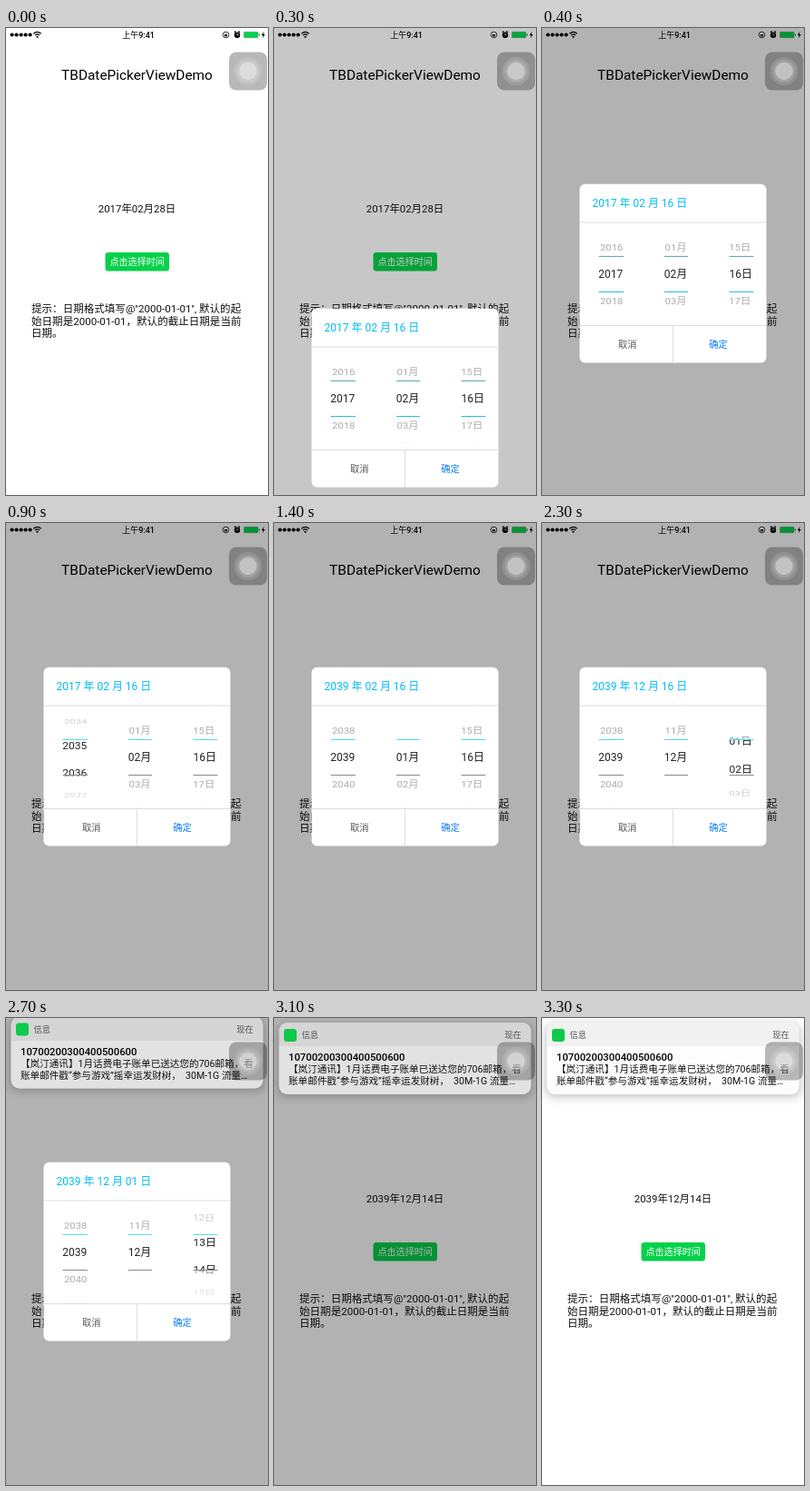
Recreate the animation shown at these times as an HTML page. Size 289 by 514 pixels, loop 4000 ms.

```html
<!DOCTYPE html>
<html lang="zh-CN">
<head>
<meta charset="utf-8">
<title>TBDatePickerViewDemo</title>
<style>
  html, body { margin: 0; width: 100%; height: 100%; overflow: hidden; background: #fff; }
  svg { display: block; width: 100vw; height: 100vh; font-family: Roboto, "Noto Sans CJK SC", sans-serif; }
  text { white-space: pre; }
  .mid { text-anchor: middle; }
</style>
</head>
<body>
<svg viewBox="0 0 289 514">
  <defs>
    <filter id="blur" x="-20%" y="-40%" width="140%" height="180%"><feGaussianBlur stdDeviation="5"/></filter>
    <clipPath id="inside"><rect x="42" y="238" width="205" height="40"/></clipPath>
    <clipPath id="outside"><path d="M42 203h205v35H42zM42 278h205v35H42z"/></clipPath>
  </defs>
  <rect width="289" height="514" fill="#fff"/>

  <g id="topBar">
    <g id="dots"></g>
    <g fill="none" stroke="#000" stroke-width="1.2">
      <path d="M30.3 6.2Q34.5 2.4 38.7 6.2M32 8.1Q34.5 5.8 37 8.1"/>
      <circle cx="242.5" cy="7.5" r="3.3" stroke-width=".8"/>
      <path d="M252 4.8l1.6-1.3M258 4.8l-1.6-1.3"/>
    </g>
    <circle cx="34.5" cy="9.8" r="1.1"/>
    <path d="M241 7h3v2.3h-3z"/>
    <circle cx="255" cy="7.7" r="3.2"/>
    <path d="M255 5.8v2h1.6" fill="none" stroke="#fff" stroke-width=".7"/>
    <rect x="262.5" y="4.3" width="15.5" height="6.4" rx="1" fill="#06d24c" stroke="#4a9a62" stroke-width=".5"/>
    <path d="M278.8 6.2h1.2v2.6h-1.2z" fill="#4a9a62"/>
    <path d="M284.6 3.8l-2.8 4.3h1.7l-.7 3.2 2.9-4.4h-1.8z"/>
    <text class="mid" x="146" y="10.8" font-size="9" font-weight="500">上午9:41</text>
    <text class="mid" x="144.5" y="57" font-size="15.4">TBDatePickerViewDemo</text>
  </g>

  <text id="chosen" class="mid" x="144.5" y="202.6" font-size="11.4" fill="#111"></text>
  <rect x="109.5" y="247" width="70.5" height="20.5" rx="3" fill="#04d14a"/>
  <text class="mid" x="144.7" y="261" font-size="10.1" fill="#fff">点击选择时间</text>
  <g font-size="11.56" fill="#111">
    <text x="28" y="313.2">提示：日期格式填写<tspan x="132">@"2000-01-01",</tspan><tspan x="213">默认的起</tspan></text>
    <text x="28" y="326.5">始日期是2000-01-01，默认的截止日期是当前</text>
    <text x="28" y="339.8">日期。</text>
  </g>

  <g id="noticeBase">
    <rect x="3" y="6" width="283" height="82" rx="10" fill-opacity=".2" filter="url(#blur)"/>
    <rect x="5.5" y="5" width="278" height="79" rx="9" fill="#fff"/>
  </g>
  <rect id="dim" width="289" height="514"/>

  <g id="notice">
    <path d="M5.5 31V14a9 9 0 0 1 9-9h260a9 9 0 0 1 9 9v17z" fill="#ebe9eb" fill-opacity=".64"/>
    <path d="M5.5 31h278v44a9 9 0 0 1-9 9h-260a9 9 0 0 1-9-9z" fill="#fcfcfc" fill-opacity=".65"/>
    <rect x="11" y="12" width="14" height="14" rx="3" fill="#0dca4a"/>
    <g font-size="9.3" fill="#555">
      <text x="30.5" y="22.4">信息</text>
      <text x="254.3" y="22.4">现在</text>
    </g>
    <text x="16" y="47.4" font-size="11.3" font-weight="500">10700200300400500600</text>
    <g font-size="10.6" fill="#111">
      <text x="16" y="60.4">【岚汀通讯】1月话费电子账单已送达您的706邮箱，看</text>
      <text x="16" y="73.2">账单邮件戳“参与游戏”摇幸运发财树，<tspan x="198">30M-1G</tspan><tspan x="238">流量…</tspan></text>
    </g>
  </g>

  <g id="dialog">
    <rect x="41.5" y="158.7" width="206" height="196.8" rx="6" fill="#fff"/>
    <text id="heading" x="55.5" y="184.3" font-size="12" fill="#00bdf7"></text>
    <path d="M41.5 201h206M41.5 314.5h206M144.5 314.5v41" stroke="#dedede"/>
    <g id="outer" clip-path="url(#outside)"></g>
    <g id="inner" clip-path="url(#inside)"></g>
    <path id="upperLine" d="M62.5 238.4h27.5M135 238.4h26M206.5 238.4h27"/>
    <path id="lowerLine" d="M62.5 277.5h27.5M135 277.5h26M206.5 277.5h27"/>
    <g class="mid" font-size="10.3">
      <text x="94.3" y="339" fill="#555">取消</text>
      <text x="194.5" y="339" fill="#0a7cff">确定</text>
    </g>
  </g>

  <rect x="246" y="26.5" width="42" height="42" rx="8" fill-opacity=".28"/>
  <g fill="#fff">
    <circle cx="267" cy="47.5" r="15.5" fill-opacity=".13"/>
    <circle cx="267" cy="47.5" r="12.3" fill-opacity=".15"/>
    <circle cx="267" cy="47.5" r="9.7" fill-opacity=".35"/>
  </g>
</svg>
<script>
const LOOP = 4000, STEP = 100;
const ROW_ANGLE = 0.6, RADIUS = 52, WHEEL_Y = 258;
const $ = id => document.getElementById(id);
const pad = n => String(n).padStart(2, "0");

const dialogDrop = [[300, 150], [400, 13], [500, 0], [2900, 0], [3000, 150]];
const noticeShift = [[2700, -6.5], [2800, 0]];
const dimming = [[200, 0], [300, 0.22], [400, 0.3], [3100, 0.3], [3200, 0]];
const wheels = [
  { x: 75.8, unit: "", min: 2000, max: 2100,
    keys: [[500, 2017], [600, 2020], [700, 2025.5], [800, 2031.3], [900, 2035.44], [1000, 2037.6], [1100, 2038.6], [1200, 2039]] },
  { x: 147.6, unit: "月", min: 1, max: 12,
    keys: [[1200, 2], [1400, 1], [1500, 1], [1600, 2.5], [1700, 6.8], [1800, 10.4], [1900, 11.6], [2000, 12]] },
  { x: 219.2, unit: "日", min: 1, max: 31,
    keys: [[2000, 16], [2100, 12], [2200, 5.5], [2300, 1.6], [2400, 1], [2500, 4], [2600, 9.8], [2700, 13.37], [2800, 14]] },
];
// Each date holds from its start time until the next one.
const headings = [
  [0, [2017, 2, 16]], [1300, [2039, 2, 16]], [1500, [2039, 1, 16]],
  [2100, [2039, 12, 16]], [2500, [2039, 12, 1]], [2900, [2039, 12, 14]],
];

function valueAt(keys, t) {
  const next = keys.findIndex(([time]) => time > t);
  if (next === 0) return keys[0][1];
  if (next < 0) return keys[keys.length - 1][1];
  const [t0, v0] = keys[next - 1], [t1, v1] = keys[next];
  return v0 + (v1 - v0) * (t - t0) / (t1 - t0);
}

function wheelRows({ x, unit, min, max, keys }, t, selected) {
  const position = valueAt(keys, t), middle = Math.round(position);
  let rows = "";
  for (let v = Math.max(min, middle - 2); v <= Math.min(max, middle + 2); v++) {
    const offset = v - position, distance = Math.abs(offset);
    const y = WHEEL_Y + RADIUS * Math.sin(offset * ROW_ANGLE);
    const squash = Math.cos(offset * ROW_ANGLE);
    const opacity = selected ? 1 : Math.max(0, Math.min(0.45, 0.38 - 0.37 * (distance - 1)));
    const rowX = selected ? x : x + (144.5 - x) * 0.013;
    const scale = selected ? 1 : 0.94;
    rows += `<text class="mid" y="4.3" font-size="12" fill="#222" opacity="${opacity}"
      transform="translate(${rowX} ${y}) scale(${scale} ${squash})">${pad(v)}${unit}</text>`;
  }
  return rows;
}

function show(id, visible) {
  $(id).style.display = visible ? "" : "none";
}

function draw(t) {
  const drop = valueAt(dialogDrop, t), shift = valueAt(noticeShift, t);
  const noticed = t >= 2700;

  show("topBar", !noticed);
  for (const id of ["notice", "noticeBase"]) {
    show(id, noticed);
    $(id).setAttribute("transform", `translate(0 ${shift})`);
  }
  $("dim").setAttribute("fill-opacity", valueAt(dimming, t));
  $("chosen").textContent = t < 3000 ? "2017年02月28日" : "2039年12月14日";

  show("dialog", t >= 300 && t < 3100);
  $("dialog").setAttribute("transform", `translate(0 ${drop})`);
  const [year, month, day] = headings.filter(([start]) => start <= t).pop()[1];
  $("heading").textContent = `${year} 年 ${pad(month)} 月 ${pad(day)} 日`;
  $("outer").innerHTML = wheels.map(w => wheelRows(w, t, false)).join("");
  $("inner").innerHTML = wheels.map(w => wheelRows(w, t, true)).join("");
  $("upperLine").setAttribute("stroke", drop ? "#5a9fae" : "#45dcf0");
  $("lowerLine").setAttribute("stroke", drop ? "#2fbcd6" : "#8a8a8a");
}

for (let i = 0; i < 5; i++) {
  $("dots").innerHTML += `<circle cx="${6.6 + i * 5}" cy="7.5" r="2.1"/>`;
}

let shown = -1;
function tick() {
  const t = Math.floor(performance.now() % LOOP / STEP) * STEP;
  if (t !== shown) draw(shown = t);
  requestAnimationFrame(tick);
}
tick();
</script>
</body>
</html>
```
